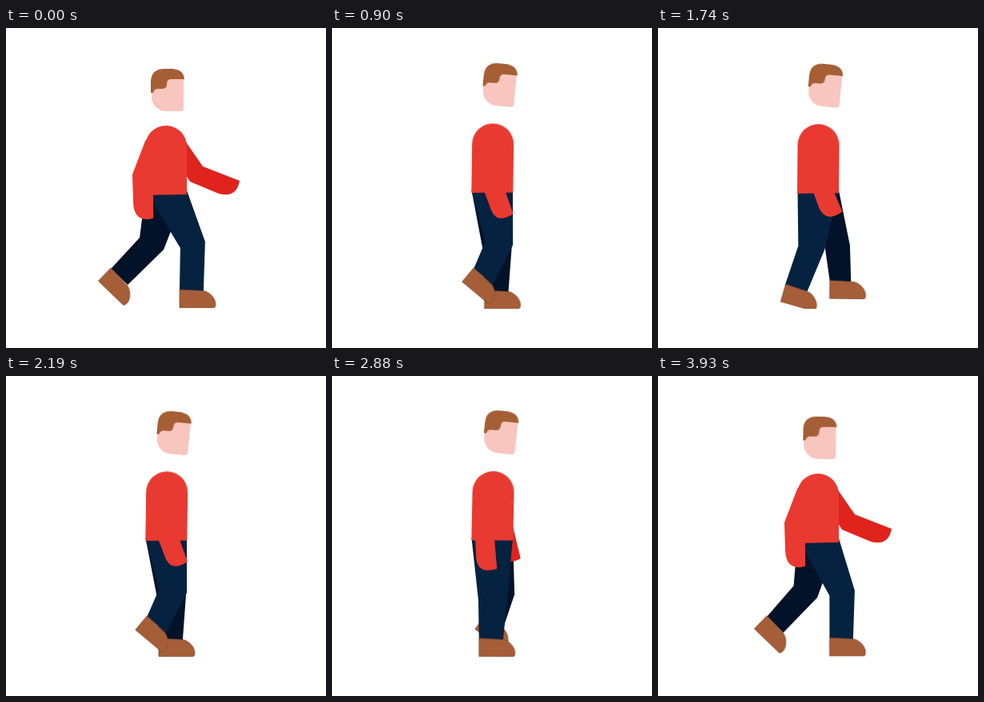
Animation of 400x400 px, one loop 3960 ms. Source, as an HTML page without scripts:

```html
<!DOCTYPE html>
<html lang="en">
<head>
<meta charset="utf-8">
<title>Walking man</title>
<style>
html, body { margin: 0; width: 100%; height: 100%; overflow: hidden; background: #fff; }
svg { display: block; width: 100vw; height: 100vh; }

/* Leg outlines and shoe placements through one stride, a to l */
:root {
  --leg-a: path("M174.5 203H226L249 267L247 329L217 328L218 275Z");
  --leg-b: path("M174.5 203H226L237 277L236 330L206 329L205 277Z");
  --leg-c: path("M174.5 203H226L225 275L221 330L191 329L189 277Z");
  --leg-d: path("M174.5 203H226L219 280L214 331L184 330L183 280Z");
  --leg-e: path("M174.5 203H226L205 276L178 329L151 319L173 270Z");
  --leg-f: path("M174.5 203H226L197 277L152 321L131 301L167 262Z");
  --leg-g: path("M174.5 203H226L205 278L167 320L146 300L176 263Z");
  --leg-h: path("M174.5 203H226L226 271L200 321L176 301L191 267Z");
  --leg-i: path("M174.5 203H226L228 273L213 317L192 300L197 269Z");
  --leg-j: path("M174.5 203H226L241 268L236 317L210 314L211 271Z");
  --leg-k: path("M174.5 203H226L239 275L246 317L219 319L206 272Z");
  --leg-l: path("M174.5 203H226L249 270L253 326L225 326L215 275Z");
  --shoe-a: translate(217px, 327px) rotate(0deg);
  --shoe-b: translate(206px, 328px) rotate(0deg);
  --shoe-c: translate(191px, 328px) rotate(0deg);
  --shoe-d: translate(184px, 328px) rotate(0deg);
  --shoe-e: translate(152px, 318px) rotate(21deg);
  --shoe-f: translate(131px, 300px) rotate(44deg);
  --shoe-g: translate(146px, 299px) rotate(44deg);
  --shoe-h: translate(176px, 300px) rotate(40deg);
  --shoe-i: translate(192px, 298px) rotate(37deg);
  --shoe-j: translate(210px, 313px) rotate(8deg);
  --shoe-k: translate(219px, 318px) rotate(-6deg);
  --shoe-l: translate(225px, 325px) rotate(-3deg);
}

.head, .torso, .leg, .shoe, .arm { animation: 3960ms linear infinite; }
.near.leg { animation-name: near-leg; fill: #062241; }
.far.leg { animation-name: far-leg; fill: #021228; }
.near.shoe { animation-name: near-shoe; }
.far.shoe { animation-name: far-shoe; }
.shoe { fill: #a65e38; stroke: #7d4528; stroke-width: .7; }
.near.arm { animation-name: near-arm; fill: #e83a30; }
.far.arm { animation-name: far-arm; fill: #e0231d; }
.torso { animation-name: sway; transform-origin: 200px 208px; fill: #e83a30; }
.head { animation-name: nod; transform-origin: 202px 78px; }

/* Three strides, then a short start of the fourth */
@keyframes near-leg {
  0%, 33.33%, 65.66%, 98.48% { d: var(--leg-a); }
  2.83%, 36.08%, 68.45% { d: var(--leg-b); }
  6%, 39.15%, 71.57% { d: var(--leg-c); }
  7.17%, 40.28%, 72.72% { d: var(--leg-d); }
  12.13%, 45.1%, 77.61% { d: var(--leg-e); }
  16.67%, 49.49%, 82.07% { d: var(--leg-f); }
  19.5%, 52.24%, 84.86% { d: var(--leg-g); }
  22.67%, 55.31%, 87.98% { d: var(--leg-h); }
  23.83%, 56.44%, 89.13% { d: var(--leg-i); }
  26.33%, 58.87%, 91.59% { d: var(--leg-j); }
  28.8%, 61.26%, 94.02% { d: var(--leg-k); }
  31.33%, 63.72%, 96.52% { d: var(--leg-l); }
  100% { d: path("M174.5 203H226L243 269L241 329.5L212 328.5L211 274Z"); }
}
@keyframes near-shoe {
  0%, 33.33%, 65.66%, 98.48% { transform: var(--shoe-a); }
  2.83%, 36.08%, 68.45% { transform: var(--shoe-b); }
  6%, 39.15%, 71.57% { transform: var(--shoe-c); }
  7.17%, 40.28%, 72.72% { transform: var(--shoe-d); }
  12.13%, 45.1%, 77.61% { transform: var(--shoe-e); }
  16.67%, 49.49%, 82.07% { transform: var(--shoe-f); }
  19.5%, 52.24%, 84.86% { transform: var(--shoe-g); }
  22.67%, 55.31%, 87.98% { transform: var(--shoe-h); }
  23.83%, 56.44%, 89.13% { transform: var(--shoe-i); }
  26.33%, 58.87%, 91.59% { transform: var(--shoe-j); }
  28.8%, 61.26%, 94.02% { transform: var(--shoe-k); }
  31.33%, 63.72%, 96.52% { transform: var(--shoe-l); }
  100% { transform: translate(212px, 327.5px) rotate(0deg); }
}
@keyframes far-leg {
  0%, 33.33%, 65.66%, 98.48% { d: var(--leg-f); }
  2.83%, 36.08%, 68.45% { d: var(--leg-g); }
  6%, 39.15%, 71.57% { d: var(--leg-h); }
  7.17%, 40.28%, 72.72% { d: var(--leg-i); }
  9.67%, 42.71%, 75.18% { d: var(--leg-j); }
  12.13%, 45.1%, 77.61% { d: var(--leg-k); }
  14.67%, 47.56%, 80.1% { d: var(--leg-l); }
  16.67%, 49.49%, 82.07% { d: var(--leg-a); }
  19.5%, 52.24%, 84.86% { d: var(--leg-b); }
  22.67%, 55.31%, 87.98% { d: var(--leg-c); }
  23.83%, 56.44%, 89.13% { d: var(--leg-d); }
  28.8%, 61.26%, 94.02% { d: var(--leg-e); }
  100% { d: path("M174.5 203H226L201 277L161 320.5L141 300.5L172 262.5Z"); }
}
@keyframes far-shoe {
  0%, 33.33%, 65.66%, 98.48% { transform: var(--shoe-f); }
  2.83%, 36.08%, 68.45% { transform: var(--shoe-g); }
  6%, 39.15%, 71.57% { transform: var(--shoe-h); }
  7.17%, 40.28%, 72.72% { transform: var(--shoe-i); }
  9.67%, 42.71%, 75.18% { transform: var(--shoe-j); }
  12.13%, 45.1%, 77.61% { transform: var(--shoe-k); }
  14.67%, 47.56%, 80.1% { transform: var(--shoe-l); }
  16.67%, 49.49%, 82.07% { transform: var(--shoe-a); }
  19.5%, 52.24%, 84.86% { transform: var(--shoe-b); }
  22.67%, 55.31%, 87.98% { transform: var(--shoe-c); }
  23.83%, 56.44%, 89.13% { transform: var(--shoe-d); }
  28.8%, 61.26%, 94.02% { transform: var(--shoe-e); }
  100% { transform: translate(141px, 299.5px) rotate(44deg); }
}

/* Arms rest for a moment at the end of the swing */
@keyframes near-arm {
  0%, .67%, 32.33%, 33.98%, 64.69%, 66.31%, 97.5%, 100% { d: path("M215 150L184 195L184 238Q160 244 159 218L158 183L174.5 140Z"); }
  7.17%, 26.33%, 40.28%, 58.87%, 72.72%, 91.59% { d: path("M222 150L203 205L206 241Q181 249 180 226L178 180L178 148Z"); }
  12.13%, 45.1%, 77.61% { d: path("M222 150L226 207L238 226Q220 243 208 225L197 207L180 150Z"); }
  16.67%, 49.49%, 82.07% { d: path("M222 150L226 197L245 218Q230 239 215 223L202 206L180 150Z"); }
  19.5%, 52.24%, 84.86% { d: path("M222 150L226 198L243 220Q228 239 213 224L201 207L180 150Z"); }
  22.67%, 55.31%, 87.98% { d: path("M222 150L218 207L227 232Q208 245 200 229L191 206L180 150Z"); }
}
@keyframes far-arm {
  0%, .67%, 32.33%, 33.98%, 64.69%, 66.31%, 97.5%, 100% { d: path("M219 134L246 173L292 191Q288 213 266 207L230 192L210 160Z"); }
  7.17%, 26.33%, 40.28%, 58.87%, 72.72%, 91.59% { d: path("M224 150L226 187L236 228Q214 240 210 215L203 190L205 150Z"); }
  12.13%, 22.67%, 45.1%, 55.31%, 77.61%, 87.98% { d: path("M222 150L200 190L200 235Q180 240 180 214L178 180L180 150Z"); }
  16.67%, 19.5%, 49.49%, 52.24%, 82.07%, 84.86% { d: path("M215 150L190 195L186 240Q167 240 167 219L166 180L175.5 148Z"); }
}

/* Two bobs for each stride */
@keyframes nod {
  0%, 16.67%, 33.33%, 49.49%, 65.66%, 82.07%, 98.48% { transform: translate(0, 0) rotate(0deg); }
  2.83%, 19.5%, 36.08%, 52.24%, 68.45%, 84.86% { transform: translate(2.5px, -2px) rotate(3deg); }
  6%, 22.67%, 39.15%, 55.31%, 71.57%, 87.98% { transform: translate(7.5px, -6.5px) rotate(5.5deg); }
  7.17%, 23.83%, 40.28%, 56.44%, 72.72%, 89.13% { transform: translate(9px, -7.5px) rotate(6deg); }
  9.67%, 26.33%, 42.71%, 58.87%, 75.18%, 91.59% { transform: translate(9px, -7.5px) rotate(6deg); }
  12.13%, 28.8%, 45.1%, 61.26%, 77.61%, 94.02% { transform: translate(5px, -4.5px) rotate(5deg); }
  14.67%, 31.33%, 47.56%, 63.72%, 80.1%, 96.52% { transform: translate(1.5px, -1.5px) rotate(1.5deg); }
  100% { transform: translate(.8px, -.6px) rotate(1deg); }
}
@keyframes sway {
  0%, 16.67%, 33.33%, 49.49%, 65.66%, 82.07%, 98.48%, 100% { transform: translate(0, 0) rotate(0deg); }
  2.83%, 19.5%, 36.08%, 52.24%, 68.45%, 84.86% { transform: translate(0, -1px) rotate(0deg); }
  6%, 22.67%, 39.15%, 55.31%, 71.57%, 87.98% { transform: translate(.3px, -2.7px) rotate(.8deg); }
  7.17%, 26.33%, 40.28%, 58.87%, 72.72%, 91.59% { transform: translate(.3px, -3px) rotate(1.2deg); }
  12.13%, 28.8%, 45.1%, 61.26%, 77.61%, 94.02% { transform: translate(0, -1.5px) rotate(.2deg); }
}
</style>
</head>
<body>
<svg viewBox="0 0 400 400">
  <defs>
    <clipPath id="floor"><rect width="400" height="350.5"/></clipPath>
    <path id="shoe" d="M0 0L30 1.5C38 3 45 11 45 18Q45 22.5 43 22.5H0Z"/>
  </defs>
  <g clip-path="url(#floor)">
    <path class="far leg" d="M174.5 203H226L197 277L152 321L131 301L167 262Z"/>
    <use class="far shoe" href="#shoe"/>
    <path class="far arm" d="M219 134L246 173L292 191Q288 213 266 207L230 192L210 160Z"/>
    <path class="near leg" d="M174.5 203H226L249 267L247 329L217 328L218 275Z"/>
    <use class="near shoe" href="#shoe"/>
  </g>
  <path class="torso" d="M174 209V148a26 26 0 0 1 52 0V208Z"/>
  <path class="near arm" d="M215 150L184 195L184 238Q160 244 159 218L158 183L174.5 140Z"/>
  <g class="head">
    <path fill="#f8c6bf" d="M182 72V86a18 18 0 0 0 18 18H218Q222 104 222 100V62H190Z"/>
    <path fill="#a65e35" d="M181 81V68Q181 51 198 51H208Q222 52 223 64H206Q201 64 201 70Q201 76 195 76H190Q185 76 184 81Z"/>
  </g>
</svg>
</body>
</html>
```
